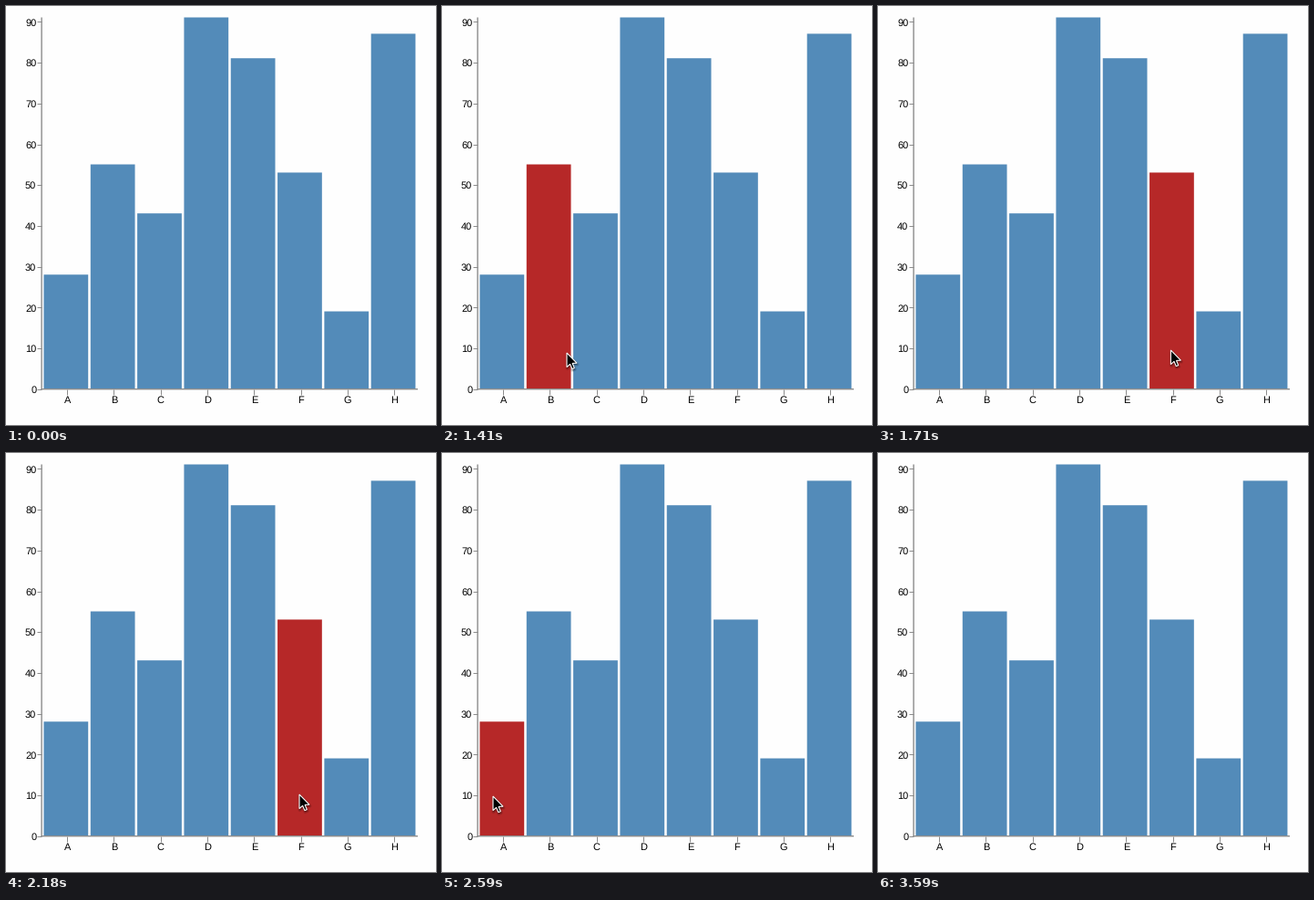
A matplotlib script for the animation above (5.29 s loop, 472 by 459 pixels).

```python
import numpy as np
import matplotlib.pyplot as plt
from matplotlib.animation import FuncAnimation
from matplotlib.patches import Polygon, Rectangle

plt.rcParams["text.hinting"] = "none"

W, H, DPI = 472, 459, 64
PX = 72 / DPI                      # points per pixel
LOOP, TICK = 5290, 10              # ms
BLUE, RED, GREY = "#538bb9", "#b62828", "#8c8c8c"

VALUES = dict(A=28, B=55, C=43, D=91, E=81, F=53, G=19, H=87)
LEFT, BASE, TOP = 38.9, 419.5, 12.5
STEP = 51.32
UNIT = (BASE - TOP) / max(VALUES.values())

# The pointer moves once per stride; key points are (stride, x, y).
START, STRIDE, LAST = 820, 59, 46
LAG = 0.5                          # highlight trails the pointer, in strides
KEYS = np.array([
    (0, 52, 443), (4, 232, 443), (6, 60, 432), (8, 56, 387),
    (10, 137, 380), (13, 263, 377), (15.5, 336, 377), (19.5, 62, 376),
    (22, 303, 374), (24, 341, 374), (25, 262, 375), (30, 56, 376),
    (44, 56, 376), (46, 29, 441)]).T
ARROW = np.array([(0, 0), (0, 15.6), (3.6, 12.3), (5.9, 17.6),
                  (8.3, 16.6), (6.1, 11.4), (11, 11.2)])


def path(k):
    return np.array([np.interp(k, KEYS[0], axis) for axis in KEYS[1:]])


def bar_at(x, y):
    """Index of the bar column under a point, or None below the axis."""
    return int((x - LEFT) // STEP) if y < BASE else None


fig = plt.figure(figsize=(W / DPI, H / DPI), dpi=DPI, facecolor="#fefefe")
ax = fig.add_axes([0, 0, 1, 1])
ax.set_xlim(0, W)
ax.set_ylim(H, 0)
ax.axis("off")


def line(x0, y0, x1, y1, width=1, snap=True):
    ax.plot([x0, x1], [y0, y1], color=GREY, lw=width * PX, snap=snap,
            solid_capstyle="butt", zorder=3)


def label(x, y, text, align):
    ax.text(x, y, text, ha=align, va="baseline", color="black",
            family="Liberation Sans", size=11 * PX)


bars = []
for i, (name, value) in enumerate(VALUES.items()):
    bar = Rectangle((LEFT + STEP * (i + 0.05), BASE), 0.95 * STEP,
                    -value * UNIT, facecolor=BLUE, lw=0, snap=False)
    bars.append(ax.add_patch(bar))
    mid = 67 + STEP * i
    line(mid, BASE, mid, BASE + 6)
    label(mid + 0.2, 435, name, "center")

for value in range(0, 91, 10):
    y = BASE - value * UNIT
    line(33.5, y + 0.4, LEFT, y + 0.4)
    label(33.3, y + 4.5, str(value), "right")

line(LEFT + 0.2, TOP, LEFT + 0.2, BASE + 0.7, 1.4, snap=False)
line(LEFT - 0.5, BASE + 0.2, 452, BASE + 0.2, 1.4, snap=False)

shadows = [ax.add_patch(Polygon(ARROW, facecolor="black", edgecolor="black",
                                lw=w * PX, alpha=0.1, joinstyle="round",
                                zorder=5)) for w in (1, 2.5, 4)]
arrow = ax.add_patch(Polygon(ARROW, facecolor="black", edgecolor="white",
                             lw=1.1 * PX, joinstyle="miter", zorder=6))


def update(n):
    k = (n * TICK - START + 5) // STRIDE
    shown = n * TICK >= START and k <= LAST
    lit = bar_at(*path(k - LAG)) if shown else None
    for i, bar in enumerate(bars):
        bar.set_facecolor(RED if i == lit else BLUE)
    for part in [*shadows, arrow]:
        part.set_visible(shown)
    tip = path(k)
    arrow.set_xy(ARROW + tip)
    for part in shadows:
        part.set_xy(ARROW + tip + (0.5, 1.5))
    return [*bars, *shadows, arrow]


anim = FuncAnimation(fig, update, frames=LOOP // TICK, interval=TICK,
                     repeat=True)
plt.show()
```
